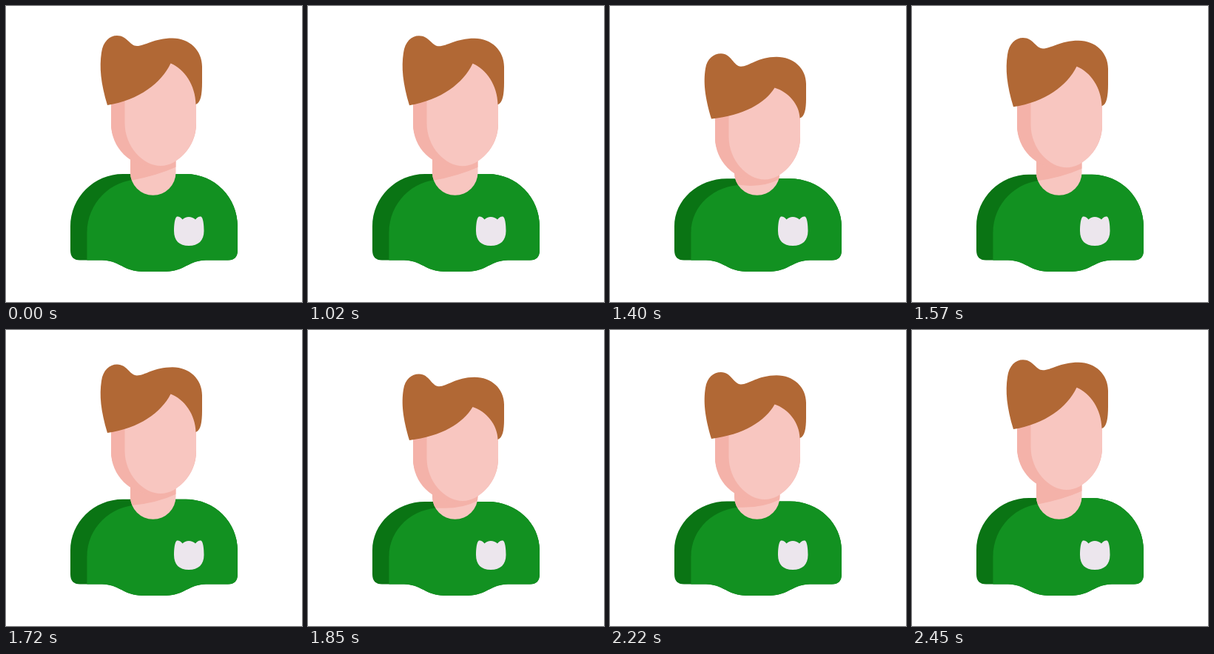
These frames come from a looping animation (400x400 px, 2470 ms). An HTML page:

```html
<!DOCTYPE html>
<html lang="en">
<head>
<meta charset="utf-8">
<title>Nodding man</title>
<style>
html, body { margin: 0; height: 100%; overflow: hidden; background: #fff; }
svg { display: block; width: 100vw; height: 100vh; }
</style>
</head>
<body>
<svg viewBox="0 0 400 400">
  <defs>
    <clipPath id="neckClip"><path d="M168 190H229.5V225A30.7 30.7 0 0 1 168 225Z"/></clipPath>
  </defs>
  <path id="shirt" fill="#0a7414"/>
  <path id="shirtLight" fill="#129121"/>
  <path fill="#ece6ed" d="M231 284.5Q235 284 238.5 288.5Q242 285 247 285T256 288.5Q259.500 284 263.500 284.500C266.500 286 267.500 296 267.500 304C267.500 317 260 324 247 324S227 317 227 304C227 296 228 286 231 284.500Z"/>
  <g clip-path="url(#neckClip)">
    <path fill="#f8c6c0" d="M168 190H230V257H168Z"/>
    <path id="neckShade" fill="#f4b2a9"/>
  </g>
  <g id="face">
    <path fill="#f4b2a9" d="M142 75H257V158L209 216C175 216 142 190 142 160Z"/>
    <path fill="#f4b2a9" d="M142 75H257V159.500A57.500 57.500 0 0 1 142 159.500Z"/>
    <path fill="#f8c6c0" d="M160.500 75H257V158C257 190 232 216 209 216C185 216 160.500 190 160.500 158Z"/>
  </g>
  <path id="hair" fill="#b16835"/>
</svg>
<script>
const LOOP = 2470;
// Time in ms and how far the head is lowered, 0 to 1.
const KEYS = [[1000, 0], [1377, 1], [1626, 0], [2070, 1], [LOOP, 0]];

const el = id => document.getElementById(id);
const smooth = x => x * x * (3 - 2 * x);

function nod(time) {
  const i = KEYS.findIndex(key => time < key[0]);
  if (i < 1) return 0;
  const [t0, from] = KEYS[i - 1], [t1, to] = KEYS[i];
  const x = (time - t0) / (t1 - t0);
  // The second lowering settles more slowly.
  const eased = i === 3 ? smooth(1 - (1 - x) ** 1.7) : smooth(x);
  return from + (to - from) * eased;
}

function draw(p) {
  const y = (up, down) => (up + (down - up) * p).toFixed(2);
  const set = (id, d) => el(id).setAttribute('d', d);
  const hem = 'C152 343.500 160 358.700 183 358.700H217C240 358.700 248 343.500 270 343.500H300Q313 343.500 313 330V298';
  const top = y(227, 233.5);
  const ctrl = y(258.7, 262);

  set('shirt', `M87 298V330Q87 343.500 100 343.500H130${hem}
    C313 ${ctrl} 282 ${top} 243 ${top}H158C119 ${top} 87 ${ctrl} 87 298Z`);
  set('shirtLight', `M109.500 343.500H130${hem}
    C313 ${ctrl} 282 ${top} 243 ${top}H200V${y(234.5, 242)}H180
    C141 ${y(234.5, 242)} 109.500 ${y(267, 270)} 109.500 306Z`);
  set('neckShade', `M168 190H230V${y(217.5, 234)}Q${y(203, 204)} ${y(229.5, 248)} 168 ${y(236, 241)}Z`);
  el('face').setAttribute('transform', `translate(0 ${y(0, 19)})`);
  set('hair', `M137 ${y(134, 153)}
    C128 ${y(104, 123)} 126 ${y(83, 103)} 129 ${y(63, 85)}
    C131 ${y(48, 72)} 140 ${y(40, 65)} 150 ${y(40, 65)}
    C164 ${y(40, 65)} 167 ${y(54, 82.5)} 177 ${y(54, 82.5)}
    C188 ${y(54, 82.5)} 200 ${y(43.5, 69.5)} 225 ${y(43.5, 69.5)}
    C248 ${y(43.5, 69.5)} 265 ${y(60, 85)} 265 ${y(82, 106)}
    V${y(103, 126)}C265 ${y(120, 140)} 263 ${y(131, 150)} 256.500 ${y(133, 152)}
    C256 ${y(107, 134)} 241 ${y(85, 117)} 222.500 ${y(77.5, 111.5)}
    C210 ${y(104, 132)} 180 ${y(127, 149)} 137 ${y(134, 153)}Z`);
}

function frame(now) {
  draw(nod(now % LOOP));
  requestAnimationFrame(frame);
}
requestAnimationFrame(frame);
</script>
</body>
</html>
```
